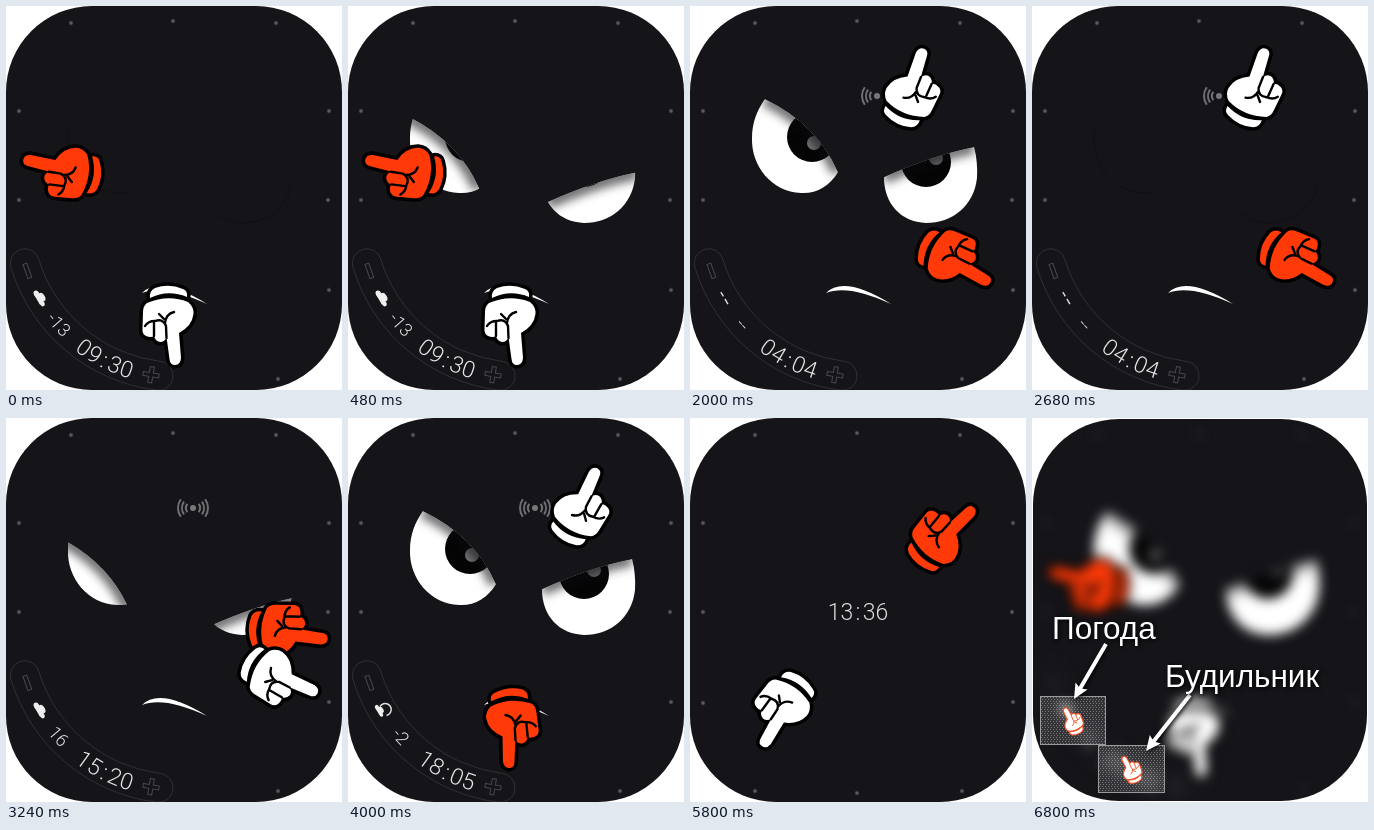
Animation, 336 px wide and 384 px high, one loop 8800 ms. Source, as an HTML page with a canvas:

```html
<!DOCTYPE html>
<html lang="ru">
<head>
<meta charset="utf-8">
<title>Watch face</title>
<style>
html, body { margin: 0; width: 100%; height: 100%; overflow: hidden; background: #fff; }
canvas { display: block; }
</style>
</head>
<body>
<canvas id="stage" width="336" height="384"></canvas>
<script>
const W = 336, H = 384, LOOP = 8800;
const CX = 168, CY = 194;
const BG = '#141419', RED = '#ff3a08', WHITE = '#fff';
const RAD = Math.PI / 180;
const stage = document.getElementById('stage').getContext('2d');
const layer = document.createElement('canvas');
layer.width = W;
layer.height = H;

const DOTS = [[65, 17], [167, 15], [270, 17], [13, 105], [323, 105],
  [13, 194], [322, 194], [323, 284], [272, 373]];
const AOD_DOTS = [[13, 285], [65, 373], [167, 375]];

const SCENES = [
  { from: 0, h: 9, m: 30, temp: '-13', icon: 'cloud' },
  { from: 1000, h: 19, m: 35, temp: '12', icon: 'cloud' },
  { from: 2000, h: 4, m: 4, temp: '--', icon: 'none', signal: true },
  { from: 2920, h: 15, m: 20, temp: '16', icon: 'cloud', signal: true },
  { from: 4000, h: 18, m: 5, temp: '-2', icon: 'moon', signal: true },
  { from: 4800, h: 9, m: 30, aod: true },
  { from: 5800, h: 13, m: 36, aod: true },
  { from: 6800, h: 9, m: 30, temp: '-13', icon: 'cloud', help: true }
];

const EYES = [
  {
    shape: new Path2D('M75 93Q127 118 148 166C140 180 126 188 111 187C82 186 61 160 62 132C62 117 67 104 75 93Z'),
    lid: 'M75 93Q127 118 148 166',
    below: 'M25 69L75 93Q127 118 148 166L165 202L80 290L-60 160Z',
    slide: [-50, 50], pupil: [122, 131], glint: [124, 137]
  },
  {
    shape: new Path2D('M194 171Q243 149 284 141Q288 156 287 172C284 200 262 217 236 217C211 216 194 198 194 171Z'),
    lid: 'M194 171Q243 149 284 141',
    below: 'M149 191L194 171Q243 149 284 141L333 131L340 300L150 300Z',
    slide: [16, 76], pupil: [236, 156], glint: [246, 152]
  }
].map(e => ({ ...e, lid: new Path2D(e.lid), below: new Path2D(e.below) }));

// Glove drawn for the minute hand at 12, relative to the dial centre
const GLOVE = new Path2D(
  'M-5 -133L-7 -158Q-6.5 -165 -1 -165Q4 -165 4.5 -159L7.5 -137' +
  'Q9 -142 14 -142Q19 -141 20 -136Q23 -138 28 -136Q32 -134 31.5 -129L31 -112' +
  'Q31 -106 27 -103Q6 -94 -14 -102Q-20 -107 -19.5 -114Q-18 -126 -5 -133Z' +
  'M-13 -97Q-14 -91 -9 -89Q5 -83 19 -88Q25 -91 24 -98Q6 -89 -13 -97Z');
const CREASES = new Path2D('M7.5 -138L8 -126Q11 -118 19 -121Q26 -121 29 -126' +
  'M20 -136L20 -122M9 -123Q8 -114 0 -112M10 -119L15 -114');

function glove(c, fill, edge) {
  c.lineJoin = c.lineCap = 'round';
  c.strokeStyle = edge;
  c.lineWidth = 7;
  c.stroke(GLOVE);
  c.fillStyle = fill;
  c.fill(GLOVE);
  c.lineWidth = 2.4;
  c.stroke(CREASES);
}

function hand(c, angle, isHour) {
  c.save();
  c.translate(CX, CY);
  c.rotate(angle * RAD);
  if (isHour) {
    c.translate(0, -146);
    c.rotate(-8 * RAD);
    c.translate(0, 155);
    c.scale(-1, 1);
  }
  glove(c, isHour ? RED : WHITE, '#000');
  c.restore();
}

function disc(c, x, y, r, color) {
  c.fillStyle = color;
  c.beginPath();
  c.arc(x, y, r, 0, 7);
  c.fill();
}

// Limits drawing to the area under an eyelid lowered by the given share
function clipLid(c, e, share) {
  const dx = e.slide[0] * share, dy = e.slide[1] * share;
  c.translate(dx, dy);
  c.clip(e.below);
  c.translate(-dx, -dy);
}

function eye(c, e, open) {
  c.save();
  if (open <= 0) {
    clipLid(c, e, .5);
    c.strokeStyle = '#101014';
    c.lineWidth = 1;
    c.stroke(e.shape);
    c.restore();
    return;
  }
  c.clip(e.shape);
  clipLid(c, e, 1 - open);
  c.fillStyle = WHITE;
  c.fillRect(0, 0, W, H);
  disc(c, ...e.pupil, 25, '#050506');
  disc(c, ...e.glint, 7, '#77777a');
  c.translate(e.slide[0] * (1 - open), e.slide[1] * (1 - open));
  c.filter = 'blur(5px)';
  c.strokeStyle = 'rgba(10,10,14,.6)';
  c.lineWidth = 14;
  c.stroke(e.lid);
  c.restore();
}

// Places a drawing on the curved panel, upright towards its centre
function onPanel(c, deg, draw) {
  c.save();
  c.translate(172, 211);
  c.rotate((deg - 90) * RAD);
  c.translate(0, 160);
  draw();
  c.restore();
}

function arcText(c, str, deg, size) {
  c.font = `300 ${size}px Roboto, sans-serif`;
  c.textAlign = 'center';
  c.textBaseline = 'alphabetic';
  c.fillStyle = '#e4e4e6';
  const widths = [...str].map(ch => c.measureText(ch).width);
  let x = -widths.reduce((a, b) => a + b, 0) / 2;
  [...str].forEach((ch, i) => {
    onPanel(c, deg - (x + widths[i] / 2) / 160 / RAD, () => c.fillText(ch, 0, size * .38));
    x += widths[i];
  });
}

function cloud(c) {
  c.scale(1.3, .9);
  disc(c, -4, 1, 3, '#eee');
  disc(c, 0, -2, 3.6, '#eee');
  disc(c, 4, 1, 2.6, '#eee');
  c.fillRect(-4, 0, 8, 3.8);
}

function weather(c, icon) {
  onPanel(c, 149.5, () => {
    if (icon === 'none') {
      c.fillStyle = '#ddd';
      c.fillRect(-7, -1, 5, 1.4);
      c.fillRect(1, -1, 6, 1.4);
      return;
    }
    if (icon === 'moon') {
      c.strokeStyle = '#ddd';
      c.lineWidth = 1.5;
      c.beginPath();
      c.arc(1, -3, 6, 2.6, 6.6);
      c.stroke();
      c.scale(.75, .75);
      c.translate(-1, 3);
    }
    cloud(c);
  });
}

function panel(c, s) {
  const a0 = 163.2, a1 = 97;
  c.strokeStyle = '#303034';
  c.lineWidth = 1;
  c.beginPath();
  c.arc(172, 211, 174.5, a1 * RAD, a0 * RAD);
  const cap = (deg, turn) => {
    const a = deg * RAD;
    const start = turn ? a : a + Math.PI;
    c.arc(172 + 160 * Math.cos(a), 211 + 160 * Math.sin(a), 14.5, start, start + Math.PI);
  };
  cap(a0, true);
  c.arc(172, 211, 145.5, a0 * RAD, a1 * RAD, true);
  cap(a1, false);
  c.closePath();
  c.stroke();

  c.strokeStyle = '#48484c';
  onPanel(c, 160.3, () => c.strokeRect(-7.5, -2, 15, 4));
  onPanel(c, 99.7, () => c.stroke(
    new Path2D('M-8 -2H-2V-8H2V-2H8V2H2V8H-2V2H-8Z')));
  weather(c, s.icon);
  arcText(c, s.temp, 138, 18);
  arcText(c, clock(s), 117.2, 23);
}

// Hair spaces loosen the colon
function clock(s) {
  return [s.h, s.m].map(n => String(n).padStart(2, '0')).join('\u200a:\u200a');
}

function signal(c) {
  disc(c, 187, 90, 3, '#77777a');
  c.strokeStyle = '#707074';
  c.lineWidth = 2;
  for (const r of [7, 11, 15])
    for (const side of [0, Math.PI]) {
      c.beginPath();
      c.arc(187, 90, r, side - .62, side + .62);
      c.stroke();
    }
}

function mouth(c) {
  c.fillStyle = WHITE;
  c.fill(new Path2D('M136 287Q154 269 201 298Q158 278 136 287Z'));
}

function face(c, s, open) {
  for (const [x, y] of s.aod ? DOTS.concat(AOD_DOTS) : DOTS) {
    disc(c, x, y, 2.4, '#2c2c30');
    disc(c, x, y, 1.6, '#5c5c60');
  }
  if (s.aod) {
    c.font = '300 23px Roboto, sans-serif';
    c.textAlign = 'center';
    c.textBaseline = 'alphabetic';
    c.fillStyle = '#dcdcde';
    c.fillText(clock(s), 168, 202);
  } else {
    panel(c, s);
    for (const e of EYES) eye(c, e, open);
    mouth(c);
    if (s.signal) signal(c);
  }
  hand(c, (s.h % 12 + s.m / 60) * 30, true);
  hand(c, s.m * 6, false);
}

function zone(c, x, y, w, h) {
  c.fillStyle = 'rgba(120,120,124,.3)';
  c.fillRect(x, y, w, h);
  c.fillStyle = 'rgba(255,255,255,.34)';
  for (let j = 1; j < h; j += 2)
    for (let i = 1 + j % 4 / 2 | 0; i < w; i += 3) c.fillRect(x + i, y + j, 1, 1);
  c.strokeStyle = '#9a9a9c';
  c.lineWidth = 1;
  c.strokeRect(x + .5, y + .5, w - 1, h - 1);
  c.save();
  c.translate(x + w / 2, y + h / 2);
  c.rotate(-22 * RAD);
  c.scale(.35, .35);
  c.translate(-7, 125);
  glove(c, WHITE, '#f0562c');
  c.restore();
}

function arrow(c, x0, y0, x1, y1) {
  const len = Math.hypot(x1 - x0, y1 - y0);
  c.save();
  c.translate(x0, y0);
  c.rotate(Math.atan2(y1 - y0, x1 - x0));
  c.fillStyle = WHITE;
  c.beginPath();
  [[0, -2], [len - 13, -2], [len - 15, -7], [len, 0], [len - 15, 7], [len - 13, 2], [0, 2]]
    .forEach(p => c.lineTo(...p));
  c.fill();
  c.restore();
}

function help(c) {
  zone(c, 8, 278, 66, 49);
  zone(c, 66, 327, 67, 48);
  c.save();
  c.shadowColor = '#000';
  c.shadowBlur = 4;
  c.shadowOffsetX = c.shadowOffsetY = 1;
  arrow(c, 74, 226, 42, 281);
  arrow(c, 158, 277, 114, 333);
  c.font = '31.5px "Liberation Sans", Arial, sans-serif';
  c.textAlign = 'left';
  c.textBaseline = 'alphabetic';
  c.fillStyle = WHITE;
  c.fillText('Погода', 20, 221);
  c.fillText('Будильник', 133, 269);
  c.restore();
}

function openness(t) {
  const steps = (from, gap) => Math.max(0, Math.min(6, Math.floor((t - from) / gap + .001))) / 6;
  if (t < 2000) return steps(8, 112);
  if (t < 2920) return 1 - steps(2000, 680 / 6);
  return steps(2920, 560 / 6);
}

function draw(t) {
  const s = SCENES.filter(x => x.from <= t).pop();
  const c = stage;
  c.fillStyle = WHITE;
  c.fillRect(0, 0, W, H);
  c.save();
  const inset = s.help ? 1 : 0;
  c.beginPath();
  c.roundRect(inset, inset, W - 2 * inset, H - 2 * inset, 86);
  c.fillStyle = BG;
  c.fill();
  c.clip();
  if (s.help) {
    const l = layer.getContext('2d');
    l.clearRect(0, 0, W, H);
    face(l, s, 1);
    c.filter = 'blur(6px)';
    c.drawImage(layer, 0, 0);
    c.filter = 'none';
  } else {
    face(c, s, openness(t));
  }
  c.restore();
  if (s.help) help(c);
}

const start = performance.now();
function tick() {
  draw((performance.now() - start) % LOOP);
  requestAnimationFrame(tick);
}
tick();
</script>
</body>
</html>
```
